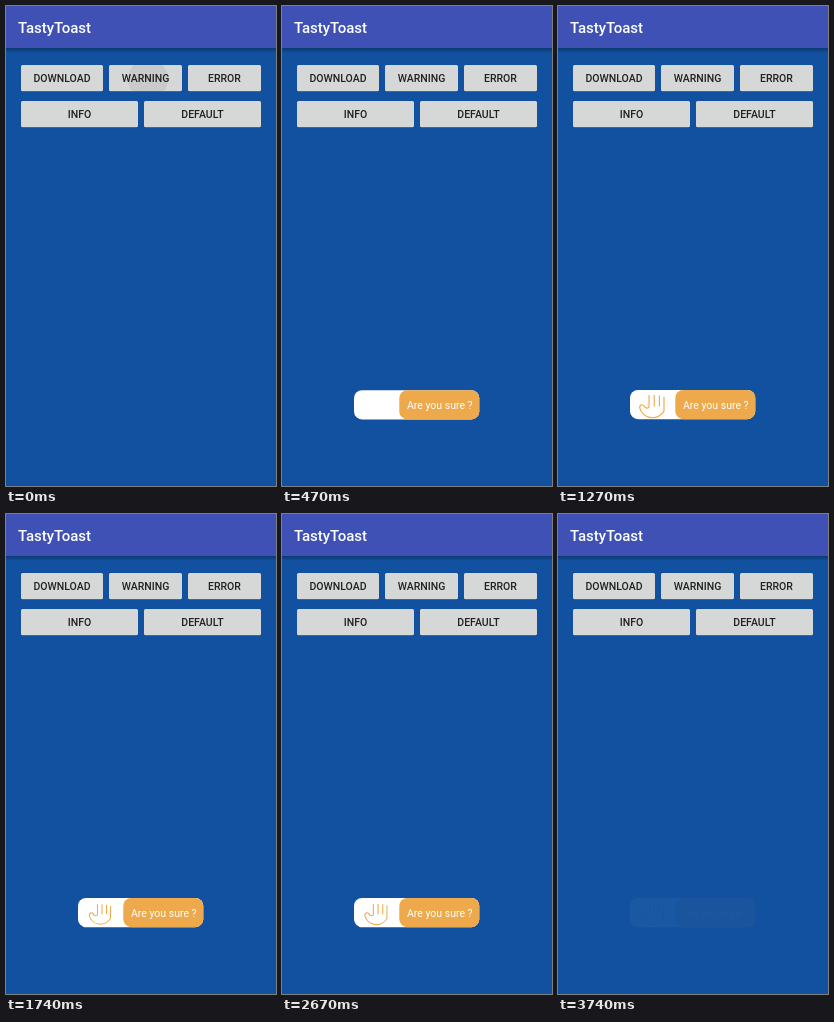
Animation of 270x480 px, one loop 4.01 s. Source, as an HTML page:

```html
<!DOCTYPE html>
<html lang="en">
<head>
<meta charset="utf-8">
<title>TastyToast</title>
<style>
  html, body { margin: 0; width: 100%; height: 100%; overflow: hidden; background: #1151a0; }
  svg { display: block; width: 270px; height: 480px; font: 10.5px Roboto, sans-serif; }
  .bar { fill: #3f51b5; }
  .title { font-size: 15px; font-weight: 500; fill: #fff; }
  .button rect { fill: #d6d7d7; }
  .button text { font-weight: 500; fill: #212121; text-anchor: middle; }
  .button .edge { fill: #000; opacity: .2; }
  #hand { fill: none; stroke: #eda94c; stroke-width: 2; }
</style>
</head>
<body>
<svg viewBox="0 0 270 480">
  <defs>
    <linearGradient id="shade" x2="0" y2="1">
      <stop stop-color="#000" stop-opacity=".3"/>
      <stop offset="1" stop-color="#000" stop-opacity="0"/>
    </linearGradient>
    <clipPath id="warning"><rect x="103" y="59" width="73" height="26.3" rx="1.5"/></clipPath>
  </defs>
  <rect class="bar" width="270" height="42"/>
  <rect y="42" width="270" height="5" fill="url(#shade)"/>
  <text class="title" x="12" y="27">TastyToast</text>
  <g id="buttons"></g>
  <circle id="ripple" cx="142" cy="73" r="20" opacity=".06" clip-path="url(#warning)"/>
  <g id="toast">
    <rect x="72" y="384" width="125.3" height="29.2" rx="8" fill="#fff"/>
    <rect x="117.3" y="384" width="80" height="29.2" rx="8" fill="#eda94c"/>
    <text x="125" y="403" fill="#fff">Are you sure ?</text>
    <!-- palm, thumb and four fingers on a 50 unit square -->
    <path id="hand" d="M2.4 28A23 23 0 0 0 45.5 34M3 28.3A4 4.2 0 0 1 11 28.2V26.2A4.5 4.2 0 0 0 19.5 27.5
      M45 10.3V35.5M37 7.9V27M28 7V27M19 7V28"/>
  </g>
</svg>
<script>
const LOOP = 4010, FRAME = LOOP / 60;
const find = id => document.getElementById(id);
const clamp = v => Math.max(0, Math.min(1, v));

const button = (label, x, y, width) => `<g class="button">
  <rect class="edge" x="${x}" y="${y + .8}" width="${width}" height="26.3" rx="1.5"/>
  <rect x="${x}" y="${y}" width="${width}" height="26.3" rx="1.5"/>
  <text x="${x + width / 2}" y="${y + 17.2}">${label}</text></g>`;

find('buttons').innerHTML =
  button('DOWNLOAD', 15, 59, 82) + button('WARNING', 103, 59, 73) + button('ERROR', 182, 59, 73) +
  button('INFO', 15, 95, 117) + button('DEFAULT', 138, 95, 117);

// Step response of a spring with tension 40 and friction 5
function spring(seconds) {
  if (seconds <= 0) return 0;
  const decay = 2.5, omega = Math.sqrt(40 - decay * decay), phase = omega * seconds;
  return 1 - Math.exp(-decay * seconds) * (Math.cos(phase) + decay / omega * Math.sin(phase));
}

function render(ms) {
  const step = Math.floor((ms + 5) / FRAME) % 60;
  const t = step * FRAME;
  const left = 1 - clamp((t - 58) / 500);
  const fadeIn = 1 - left ** 4;
  const fadeOut = t < 3500 ? 1 : Math.max(.04, .78 - (t - 3542) * .0037);
  const toast = find('toast');
  toast.setAttribute('transform', `translate(0 ${36.6 * left ** 3})`);
  toast.setAttribute('opacity', fadeIn * fadeOut);

  const size = .525 * spring(t / 1000 - .5);
  const hand = find('hand');
  hand.setAttribute('visibility', size > .02 ? 'visible' : 'hidden');
  hand.setAttribute('transform', `translate(94.5 399.3) scale(${size}) translate(-25 -25)`);
  find('ripple').setAttribute('visibility', step === 0 ? 'visible' : 'hidden');
}

const start = performance.now();
function tick() {
  render((performance.now() - start) % LOOP);
  requestAnimationFrame(tick);
}
tick();
</script>
</body>
</html>
```
